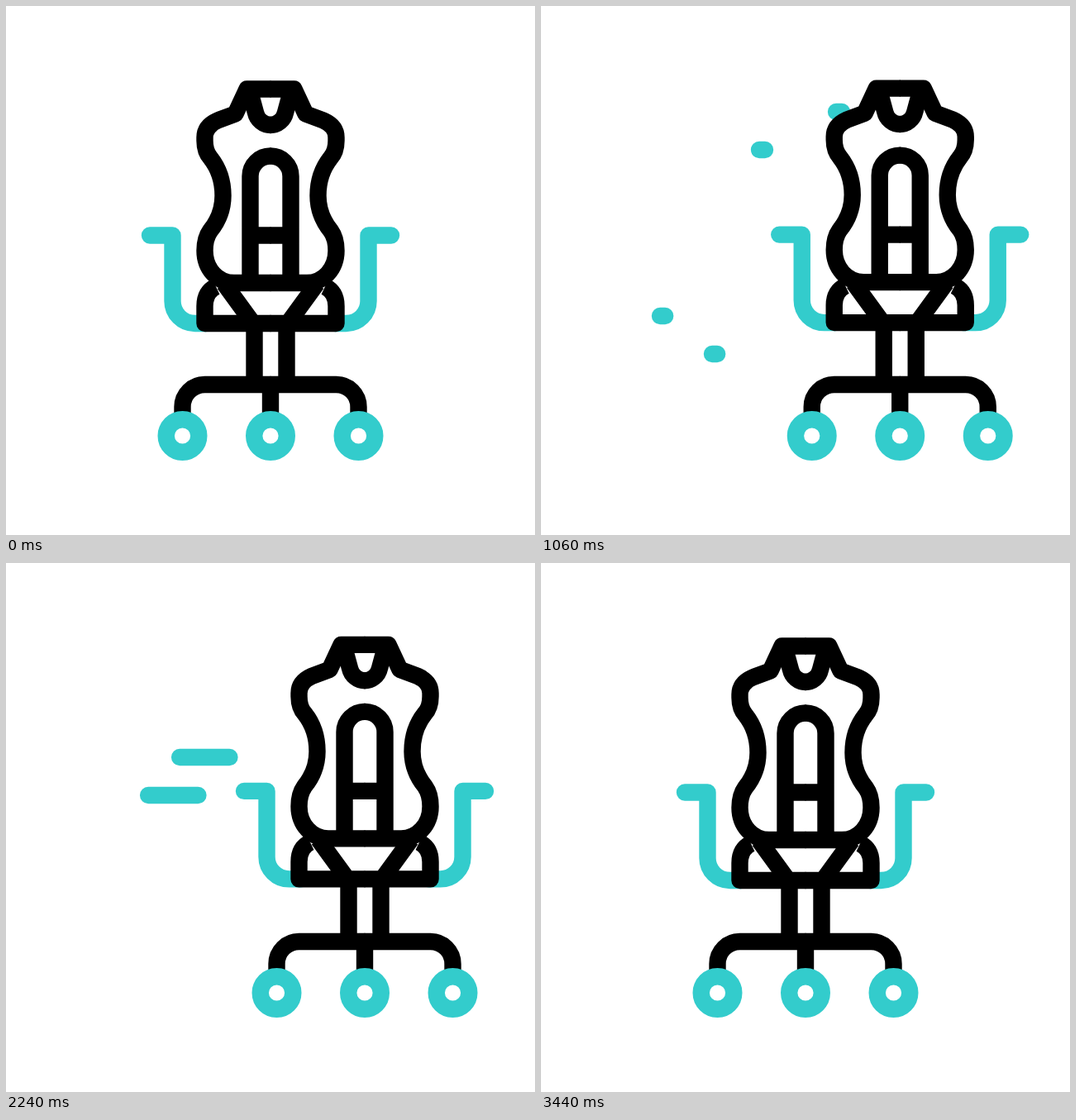
Recreate the animation shown at these times as an HTML page. Size 640 px wide and 640 px high, loop 3.6 s.

```html
<!DOCTYPE html>
<html lang="en">
<head>
<meta charset="utf-8">
<title>Rolling chair</title>
<style>
  html, body { margin: 0; width: 100%; height: 100%; overflow: hidden; background: #fff; }
  svg { display: block; width: 100%; height: 100%; }
  g { fill: none; stroke-width: 20.4; stroke-linejoin: round; }
  .dark { stroke: #000; }
  .teal { stroke: #3cc; stroke-linecap: round; }
  .flip { transform: matrix(-1, 0, 0, 1, 640, 0); }
</style>
</head>
<body>
<svg viewBox="0 0 640 640">
  <defs>
    <path id="arm" d="M174 277.5H201.500V357A27 27 0 0 0 228.500 384H242"/>
    <g id="half">
      <path d="M320.5 100.5H291.5L277.5 130.5L256 138.5C246 143 240.5 150 240.5 159V163C240.5 172 243 179 247.5 184Q262.5 203 262.5 229.5Q262.5 253 247 272Q240.5 281 240.5 296C240.5 318 256 335 276 335H320.5"/>
      <path d="M295.5 105L302 129A19 19 0 0 0 320.5 144"/>
      <path d="M320.5 181.5H320A24.5 24.5 0 0 0 295.5 206V335M295.5 277.5H320.5"/>
      <path d="M254 339.5Q240.5 346 240.5 363V384H320.5M264 336L299 384"/>
    </g>
    <path id="leg" d="M213.5 495V485A27 27 0 0 1 240.5 458H320.5"/>
  </defs>
  <g id="streaks" class="teal"></g>
  <g id="chair">
    <g class="dark">
      <path id="posts"/>
      <use href="#leg"/><use href="#leg" class="flip"/>
      <path d="M320 458V495"/>
    </g>
    <g id="seat">
      <g class="teal"><use href="#arm"/><use href="#arm" class="flip"/></g>
      <g class="dark"><use href="#half"/><use href="#half" class="flip"/></g>
    </g>
    <g class="teal">
      <circle id="wheel" cx="320" cy="520" r="19.8"/>
      <use href="#wheel" x="-106.5"/><use href="#wheel" x="106.5"/>
    </g>
  </g>
</svg>
<script>
const LOOP = 3600, END = 3440;
const byId = id => document.getElementById(id);
const clamp = (v, low, high) => Math.min(high, Math.max(low, v));

function ease(u) {
  u = clamp(u, 0, 1);
  return u * u * (3 - 2 * u);
}

// 0 at even u, 1 at odd u
const wave = u => ease(1 - Math.abs(1 - u % 2));

// Rises to 1, dips repeatedly, then falls back to 0 at END
function sway(t, rise, fall, half, dip) {
  const swinging = clamp(t, rise, END - fall) - rise;
  return ease(t / rise) * ease((END - t) / fall) - dip * wave(swinging / half);
}

// Each gust is an upper streak and a lower one moved by shift
const gusts = [
  { start: 516, left: 144, y: 375, length: 120, shift: 63 },
  { start: 1012, left: 196, y: 128, length: 168, shift: -93 },
  { start: 1456, left: 156, y: 355.5, length: 180, shift: -45 },
  { start: 2024, left: 163, y: 235, length: 108, shift: -38 }
];
const streaks = byId('streaks').appendChild(
  document.createElementNS('http://www.w3.org/2000/svg', 'path'));

function gustPath(t, { start, left, y, length, shift }) {
  const u = (t - start) / 400;
  if (u <= 0 || u >= 1.5) return '';
  const head = left + length * (1 - ease(u));
  const tail = left + length * (1 - ease(u - 0.5));
  return `M${head} ${y}H${tail}M${head + shift} ${y + 46}H${tail + shift}`;
}

function draw(t) {
  const x = 137.5 * sway(t, 600, 740, 350, 0.222);
  const lift = 33.2 * sway(t, 520, 520, 600, 1);
  byId('chair').setAttribute('transform', `translate(${x} 0)`);
  byId('seat').setAttribute('transform', `translate(0 ${-lift})`);
  byId('posts').setAttribute('d', `M300.5 458V${384 - lift}M339.5 458V${384 - lift}`);
  streaks.setAttribute('d', gusts.map(gust => gustPath(t, gust)).join(''));
}

const began = performance.now();
function tick() {
  draw((performance.now() - began) % LOOP);
  requestAnimationFrame(tick);
}
tick();
</script>
</body>
</html>
```
